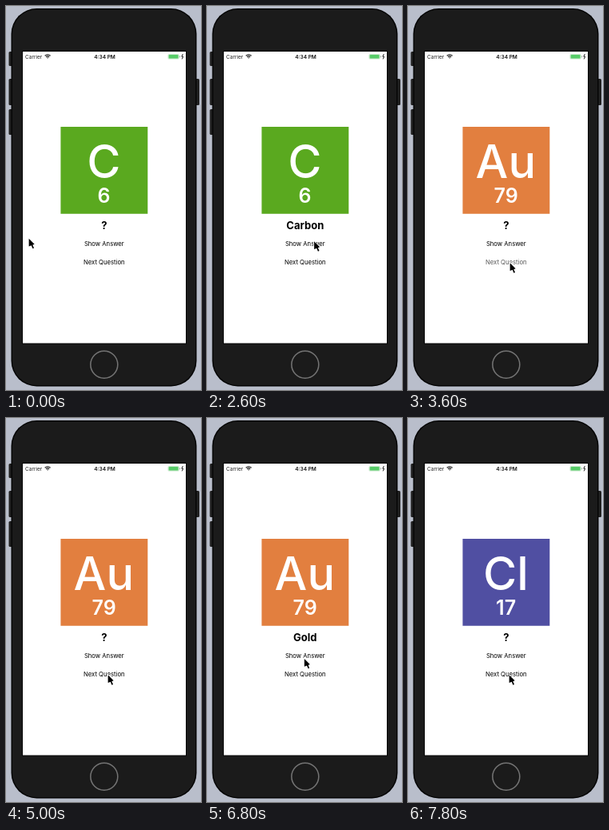
Recreate the animation shown at these times as an HTML page with a canvas. Size 244 by 480 pixels, loop 8 s.

```html
<!DOCTYPE html>
<html lang="en">
<head>
<meta charset="utf-8">
<title>Element quiz</title>
<style>
html, body { margin: 0; width: 100%; height: 100%; overflow: hidden; background: #b9becb; }
canvas { display: block; width: 244px; height: 480px; }
</style>
</head>
<body>
<canvas id="stage"></canvas>
<script>
const W = 244, H = 480, LOOP = 8000, STEP = 200, MOVE = 600, MID = 122.8;
const canvas = document.getElementById('stage');
const ctx = canvas.getContext('2d');
const dpr = window.devicePixelRatio || 1;
canvas.width = W * dpr;
canvas.height = H * dpr;
ctx.scale(dpr, dpr);

const cards = [
  { symbol: 'C', number: 6, color: '#5aa91f', name: 'Carbon' },
  { symbol: 'Au', number: 79, color: '#e27f3f', name: 'Gold' },
  { symbol: 'Cl', number: 17, color: '#504fa2', name: 'Chlorine' }
];

// Where the pointer arrives, when, and the button it then taps
const stops = [
  { at: 0, x: 28, y: 290 },
  { at: 1400, x: 115, y: 297, tap: 'answer' },
  { at: 2600, x: 133.5, y: 293.5 },
  { at: 3200, x: 127, y: 320.5, tap: 'next' },
  { at: 5600, x: 119.5, y: 293, tap: 'answer' },
  { at: 7200, x: 126, y: 320.5, tap: 'next' }
];

const clamp = v => Math.min(1, Math.max(0, v));
const mix = (a, b, p) => a + (b - a) * p;
const ease = p => p * p * (3 - 2 * p);

// Replays the stops up to time t
function stateAt(t) {
  const s = { x: stops[0].x, y: stops[0].y, card: 0, shown: false, answer: 1, next: 1 };
  for (const { at, x, y, tap } of stops) {
    const p = ease(clamp((t - at + MOVE) / MOVE));
    s.x = mix(s.x, x, p);
    s.y = mix(s.y, y, p);
    if (!tap || t <= at) continue;
    const since = t - at - STEP;
    s[tap] = mix(0.22, 1, clamp(since / 360));
    if (since < STEP) continue;
    s.shown = tap === 'answer';
    if (tap === 'next') s.card++;
  }
  return s;
}

function box(x, y, w, h, r, fill) {
  ctx.beginPath();
  ctx.roundRect(x, y, w, h, r);
  ctx.fillStyle = fill;
  ctx.fill();
}

function ring(x, y, r, from, to, width, color) {
  ctx.beginPath();
  ctx.arc(x, y, r, from, to);
  ctx.lineWidth = width;
  ctx.strokeStyle = color;
  ctx.stroke();
}

function label(text, x, y, size, weight, color = '#000', align = 'center') {
  ctx.font = `${weight} ${size}px Inter, sans-serif`;
  ctx.textAlign = align;
  ctx.fillStyle = color;
  ctx.fillText(text, x, y);
}

function drawPhone() {
  box(0, 0, W, H, 0, '#b9becb');
  box(3.5, 57, 6, 18, 1.5, '#202020');
  box(3.5, 91, 6, 33, 1.5, '#202020');
  box(3.5, 129, 6, 32, 1.5, '#202020');
  box(235, 91, 7, 33, 1.5, '#202020');
  box(6.5, 3, 232, 472.5, 32, '#050505');
  box(8, 4.5, 229, 469.5, 30.5, '#1b1b1b');
  box(20, 56, 206, 366.5, 0, '#050505');
  box(21, 57, 204, 364.5, 0, '#fff');
  ring(MID, 448.3, 17, 0, Math.PI * 2, 1.5, '#747474');
}

function drawStatus() {
  label('Carrier', 24, 65.5, 6.5, 400, '#222', 'left');
  label('4:34 PM', 123.5, 65.5, 6.5, 600, '#111');
  for (const r of [0.7, 2.8, 4.9]) {
    ring(52.1, 65.7, r, -Math.PI * 0.75, -Math.PI * 0.25, 1.2, '#222');
  }
  box(202.5, 60, 14.2, 6.6, 1.6, '#c4e6c8');
  box(203.7, 61.1, 11.8, 4.4, 0.8, '#57cc68');
  box(217.2, 62.3, 0.9, 2, 0.4, '#9aa09b');
  ctx.beginPath();
  ctx.moveTo(221.3, 60);
  ctx.lineTo(219.8, 63.2);
  ctx.lineTo(221.7, 63.2);
  ctx.lineTo(220.2, 66.4);
  ctx.lineWidth = 1;
  ctx.strokeStyle = '#222';
  ctx.stroke();
}

function drawCard({ symbol, number, color, name }, shown) {
  box(68.4, 151, 108.9, 108.7, 0, color);
  label(symbol, 122.3, 214.5, 57.5, 500, '#fff');
  label(number, 122.6, 245.5, 25, 600, '#fff');
  label(shown ? name : '?', MID, 279, 13, 700);
}

function drawButton(text, y, alpha) {
  ctx.globalAlpha = alpha;
  label(text, MID, y, 7.7, 400);
  ctx.globalAlpha = 1;
}

// An arrow head with a short tail, black over a wider white copy
function drawPointer(x, y) {
  ctx.save();
  ctx.translate(x + 0.6, y + 0.8);
  for (const [color, edge] of [['#fff', 1.5], ['#000', 0]]) {
    ctx.fillStyle = ctx.strokeStyle = color;
    ctx.beginPath();
    ctx.moveTo(0, 0);
    ctx.lineTo(0, 9.8);
    ctx.lineTo(7, 7);
    ctx.closePath();
    ctx.fill();
    if (edge) {
      ctx.lineWidth = edge;
      ctx.stroke();
    }
    ctx.beginPath();
    ctx.moveTo(3, 6);
    ctx.lineTo(5.6, 12 + edge / 2);
    ctx.lineWidth = 1.7 + edge;
    ctx.stroke();
  }
  ctx.restore();
}

const start = performance.now();
function frame() {
  const now = (performance.now() - start) % LOOP;
  const s = stateAt(Math.floor(now / STEP) * STEP);
  drawPhone();
  drawStatus();
  drawCard(cards[s.card], s.shown);
  drawButton('Show Answer', 300, s.answer);
  drawButton('Next Question', 323, s.next);
  drawPointer(s.x, s.y);
  requestAnimationFrame(frame);
}
frame();
</script>
</body>
</html>
```
